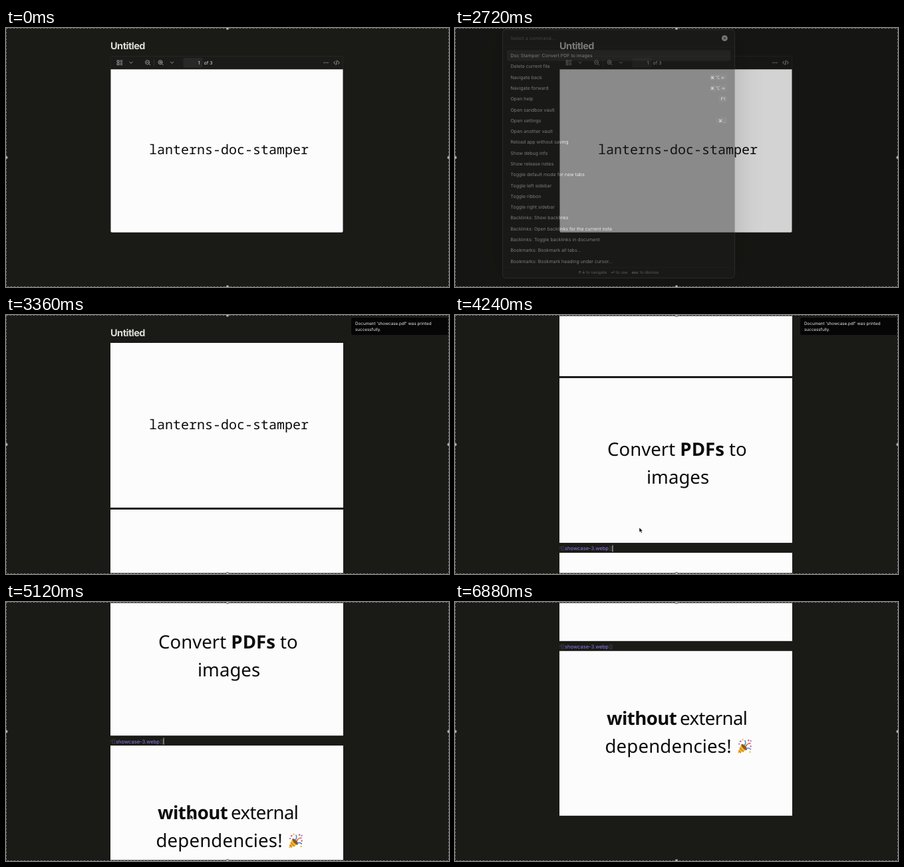
Recreate the animation shown at these times as an HTML page. Size 666 px wide and 390 px high, loop 7.04 s.

```html
<!DOCTYPE html>
<html lang="en">
<head>
<meta charset="utf-8">
<title>Document to images</title>
<style>
  html, body { margin: 0; width: 100%; height: 100%; overflow: hidden; background: #1a1b17; }
  svg { display: block; width: 666px; height: 390px; }
  text { font: 7px Inter, "DejaVu Sans", sans-serif; fill: #dcdcda; text-rendering: geometricPrecision; white-space: pre; }
  .title { font-size: 14.5px; font-weight: 700; letter-spacing: -.5px; }
  .mono { font: 20px "Noto Sans Mono", monospace; fill: #0b0b0b; }
  .slide { font: 27.6px "Noto Sans", sans-serif; fill: #0b0b0b; }
  .bold { font-weight: 700; }
  .link { font-size: 7.6px; fill: #9678ee; }
  .bracket { fill: #55506a; }
  .paper { fill: #fcfcfd; }
  .icon { fill: none; stroke: #a9a9a6; stroke-width: .9; stroke-linecap: round; stroke-linejoin: round; }
  .muted { fill: #6d6d6a; }
  .small { font-size: 6px; fill: #9c9c99; }
  .note { font-size: 6.3px; fill: #eee; }
  .end { text-anchor: end; }
  #dialog { filter: drop-shadow(0 0 22px rgba(0, 0, 0, .4)); }
</style>
</head>
<body>
<svg viewBox="0 0 666 390">
  <rect width="666" height="390" fill="#1a1b17"/>

  <g id="scroller">
    <text class="title" x="157" y="32">Untitled</text>

    <g id="editing">
      <rect id="selection" x="157" y="43" height="11" fill="#40307a"/>
      <text class="link" y="51.3"><tspan class="bracket" x="157">![[</tspan><tspan x="165">showcase.pdf</tspan><tspan class="bracket" x="216">]]</tspan></text>
    </g>

    <g id="viewer">
      <rect x="157" y="42.5" width="349.5" height="265" rx="1.5" fill="#1b1b19" stroke="#2a2b28" stroke-width=".7"/>
      <path class="paper" d="M157.5 62.3h349v243.7q0 1.7-1.7 1.7h-345.6q-1.7 0-1.7-1.7z"/>
      <rect x="266.5" y="45" width="29" height="14.5" rx="2" fill="#282926"/>
      <path d="M222.5 47v10" stroke="#30312e"/>
      <g class="icon">
        <path d="M167.5 48.8h2.6v2.6h-2.6zM167.5 53h2.6v2.6h-2.6zM172 49h2.8M172 51h2.8M172 53.3h2.8M172 55.3h2.8"/>
        <path d="M185.8 51l2.2 2.2 2.2-2.2M247.3 51l2.2 2.2 2.2-2.2"/>
        <path id="lens" d="M215.6 51.6a3 3 0 1 1-6 0a3 3 0 1 1 6 0M214.8 53.8l2 2M211.2 51.6h2.8"/>
        <use href="#lens" x="19.5"/>
        <path d="M232.1 50.2v2.8"/>
        <path d="M494.8 50l-2 2.2 2 2.2M499.2 50l2 2.2-2 2.2M497.8 49l-1.6 6.2"/>
        <path stroke-width="1.5" d="M478.2 52.3h0M481 52.3h0M483.8 52.3h0"/>
      </g>
      <text class="end" x="291.5" y="54.8">1</text>
      <text x="297.5" y="54.8">of 3</text>
      <text class="mono" x="215" y="190">lanterns-doc-stamper</text>
    </g>

    <g id="pages">
      <rect class="paper" x="157" y="42" width="350" height="248"/>
      <text class="mono" x="215" y="172">lanterns-doc-stamper</text>
      <rect class="paper" x="157" y="293" width="350" height="248"/>
      <text class="slide" x="229" y="410">Convert <tspan class="bold">PDFs</tspan> to</text>
      <text class="slide" x="288" y="452">images</text>
      <text class="link" y="552.4"><tspan class="bracket" x="157">![[</tspan><tspan x="165">showcase-3.webp</tspan><tspan class="bracket" x="231.5">]]</tspan></text>
      <path id="caret" d="M237 544.5v10" stroke="#c9c9c6"/>
      <rect class="paper" x="157" y="556" width="350" height="248"/>
      <text class="slide" y="667" letter-spacing="-.6"><tspan class="bold" x="228">without</tspan><tspan x="338">external</tspan></text>
      <text class="slide" x="225.5" y="709" letter-spacing=".15">dependencies!</text>
      <g id="popper" transform="translate(424 688)" fill="none" stroke-width="1.6" stroke-linecap="round">
        <path d="M1 22.3L6.5 8.3Q13 11 15 17z" fill="#f3b62f"/>
        <path d="M4.3 14l5.2 5.5M2.8 18l2.6 3" stroke="#d58a1c"/>
        <ellipse cx="10.8" cy="12.6" rx="5.8" ry="2.4" transform="rotate(46 10.8 12.6)" fill="#8a5a1c"/>
        <path d="M11 10q3-3 1-7" stroke="#4b8fe2"/>
        <path d="M13 12q2-5 7-5" stroke="#e0525c"/>
        <path d="M14.5 15q3-2 6 1" stroke="#4b8fe2"/>
        <path d="M5 4h.5M17 2.5h.5M20.5 11.5h.3" stroke="#e0525c" stroke-width="2.2"/>
        <path d="M8.5 1.5h.3M19.5 20h.3M16 8h.2" stroke="#f3b62f" stroke-width="2.2"/>
        <path d="M20.5 3.5h.3M3 8h.2" stroke="#9a62d0" stroke-width="2"/>
      </g>
    </g>
  </g>

  <g id="palette">
    <rect width="666" height="390" fill="#000" opacity=".32"/>
    <g id="dialog">
      <rect x="71.5" y="2.5" width="349" height="374" rx="5" fill="#191a18" stroke="#3b3c39"/>
    </g>
    <path d="M72 28.5h348M72 360.5h348" stroke="#222320"/>
    <text class="muted" x="83.5" y="17.8">Select a command...</text>
    <circle cx="405.4" cy="15.4" r="4.4" fill="#d5d5d2"/>
    <path d="M403.8 13.8l3.2 3.2m0-3.2l-3.2 3.2" stroke="#191a18"/>
    <rect x="78" y="33.3" width="336" height="16.2" rx="2" fill="#2c2d2b"/>
    <g id="commands"></g>
    <text class="small" y="370.4"><tspan class="bold" x="185">↑↓</tspan><tspan x="197">to navigate</tspan><tspan class="bold" x="234">↵</tspan><tspan x="242">to use</tspan><tspan class="bold" x="265.5">esc</tspan><tspan x="278">to dismiss</tspan></text>
  </g>

  <g id="notice">
    <rect x="519" y="4" width="146" height="26" rx="3" fill="#050505"/>
    <text class="note" x="525" y="15.3">Document 'showcase.pdf' was printed</text>
    <text class="note" x="525" y="23.5">successfully.</text>
  </g>

  <path id="arrow" d="M0 0v7.2l1.7-1.5 1.3 2.7 1.3-.6-1.2-2.6h2.2z" fill="#000" stroke="#fff" stroke-width=".6"/>
  <path id="beam" d="M-1.5-5.5q1.5 0 1.5 1v9q0 1-1.5 1M1.5-5.5q-1.5 0-1.5 1v9q0 1 1.5 1" fill="none" stroke="#e6e6e6" stroke-width=".8"/>

  <g fill="none">
    <rect x=".5" y=".5" width="665" height="389" stroke="#1a1b17" stroke-width="2"/>
    <rect x=".5" y=".5" width="665" height="389" stroke="#70716d" stroke-dasharray="3 2"/>
  </g>
  <g fill="#b9bab6" stroke="#41423e" stroke-width=".6">
    <circle cx="333" cy=".5" r="2.2"/><circle cx="333" cy="389.5" r="2.2"/>
    <circle cx=".5" cy="195" r="2.2"/><circle cx="665.5" cy="195" r="2.2"/>
  </g>
</svg>

<script>
const LOOP = 7040, STEP = 80;
const $ = id => document.getElementById(id);
const show = (id, on) => $(id).setAttribute("visibility", on ? "visible" : "hidden");
const move = (id, x, y) => $(id).setAttribute("transform", `translate(${x} ${y})`);
const clamp = v => Math.max(0, Math.min(1, v));

const commands = [
  "Doc Stamper: Convert PDF to images", "Delete current file", "Navigate back|⌘ ⌥ ←",
  "Navigate forward|⌘ ⌥ →", "Open help|F1", "Open sandbox vault", "Open settings|⌘ ,",
  "Open another vault", "Reload app without saving", "Show debug info", "Show release notes",
  "Toggle default mode for new tabs", "Toggle left sidebar", "Toggle ribbon",
  "Toggle right sidebar", "Backlinks: Show backlinks",
  "Backlinks: Open backlinks for the current note", "Backlinks: Toggle backlinks in document",
  "Bookmarks: Bookmark all tabs...", "Bookmarks: Bookmark heading under cursor..."
];
$("commands").innerHTML = commands.map((line, i) => {
  const [name, keys] = line.split("|"), y = 44.1 + i * 16.29;
  const width = keys ? keys.length * 4 + 5 : 0;
  return `<text x="83.5" y="${y}">${name}</text>` + (keys ?
    `<rect x="${409 - width}" y="${y - 7.5}" width="${width}" height="10" rx="2" fill="#222321"/>
     <text class="end" x="406" y="${y}" style="font-size:6.3px">${keys}</text>` : "");
}).join("");

// Linear interpolation through [time, value] points.
function track(t, points) {
  let [t0, v0] = points[0];
  for (const [t1, v1] of points) {
    if (t < t1) return v0 + (v1 - v0) * clamp((t - t0) / (t1 - t0));
    [t0, v0] = [t1, v1];
  }
  return v0;
}

// Trackpad scroll with momentum.
const flick = (t, start, distance, decay) =>
  t < start ? 0 : distance * (1 - Math.exp((start - t) / decay));

function draw(t) {
  const printed = t >= 3360;
  const palette = t >= 2720 && t < 3280;
  const editing = t >= 1120 && t < 2720;
  const dragX = track(t, [[1200, 157], [1600, 184], [1920, 178], [2080, 184], [2320, 221]]);

  show("editing", editing);
  $("selection").setAttribute("width", dragX - 157);
  show("viewer", !printed);
  move("viewer", 0, editing ? 12 : 0);

  show("pages", printed);
  show("caret", t >= 3360 && t < 6480);
  move("scroller", 0, -(flick(t, 3840, 222, 180) + flick(t, 4960, 234, 228) + flick(t, 6160, 27, 200)));

  show("palette", palette);
  $("palette").setAttribute("opacity", clamp((t - 2640) / 160));
  show("notice", t >= 3360 && t < 5040);

  show("beam", editing);
  move("beam", dragX, 48.5);
  show("arrow", t >= 160 && t < 1120 || t >= 3840 && t < 6480);
  if (t < 3840) {
    move("arrow", track(t, [[160, 295], [560, 158]]),
      track(t, [[160, 382], [560, 30], [880, 30], [1120, 46]]));
  } else {
    move("arrow", 277, track(t, [[6160, 320], [6480, 390]]));
  }
}

function tick() {
  const t = performance.now() % LOOP;
  draw(t - t % STEP);
  requestAnimationFrame(tick);
}
tick();
</script>
</body>
</html>
```
